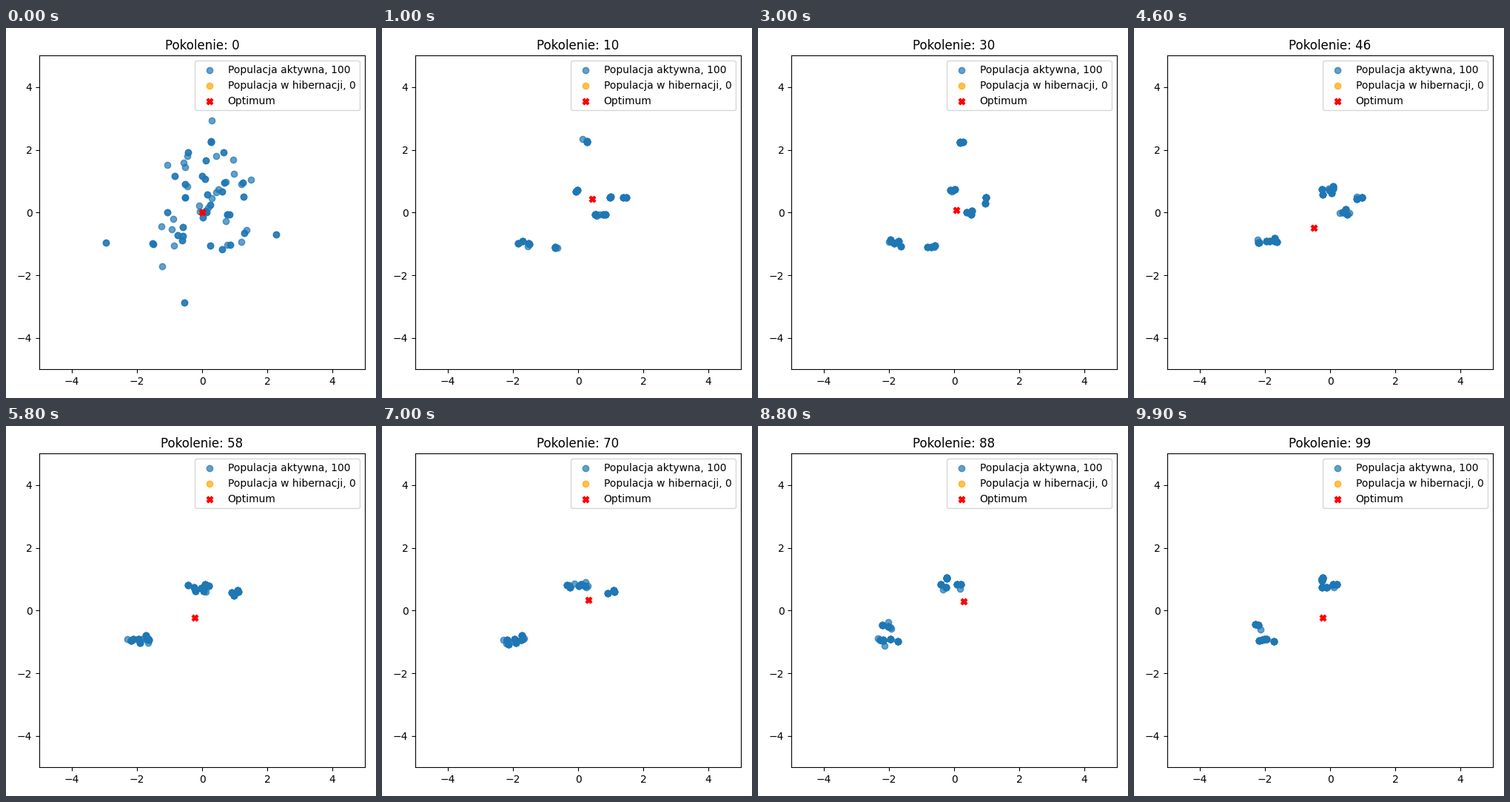
A matplotlib script that plays this animation: 500 px wide and 500 px high, repeating every 10000 ms.

```python
import matplotlib.pyplot as plt
import numpy as np
from matplotlib.animation import FuncAnimation

FRAMES, STEP_MS = 100, 100
POPULATION = 100
SPREAD = (.1, .08)

# Niches where individuals gather: x, y, first and last generation.
NICHES = [
    (.27, 2.25, 0, 36), (-.02, .72, 4, 66), (.98, .48, 6, 60),
    (1.47, .48, 6, 25), (.53, -.06, 5, 58), (.78, -.06, 0, 26),
    (-1.53, -.98, 0, 28), (-1.7, -.91, 10, 78), (-.7, -1.1, 3, 38),
    (-1.96, -.92, 26, 100), (-2.18, -.95, 42, 100), (1.1, .65, 58, 80),
    (-.26, .74, 42, 100), (.1, .83, 40, 100), (-.22, 1.05, 74, 100),
    (-2.2, -.46, 80, 100),
]
OUTLIERS = [(-2.95, -.96), (.3, 2.93), (2.27, -.7), (-1.23, -1.72),
            (-.55, -2.87)]


def first_cloud(rng, count=52):
    """Individuals scattered in a disc, denser towards its middle."""
    r = 1.75 * rng.random(count) ** .6
    a = rng.uniform(0, 2 * np.pi, count)
    disc = np.column_stack([.1 + r * np.cos(a), .3 + r * np.sin(a)])
    return np.vstack([OUTLIERS, disc])


def alive(sites, n):
    sites = np.asarray(sites)
    return sites[(sites[:, 2] <= n) & (n < sites[:, 3])]


def evolve():
    """Crowded and lone sites as rows of x, y, birth, death."""
    rng = np.random.default_rng(7)
    crowd, lone = list(NICHES), []
    for x, y, born, gone in NICHES:
        for t in range(born, gone, 12):
            dx, dy = rng.normal(0, SPREAD)
            end = min(gone, t + rng.integers(10, 24))
            crowd.append((x + dx, y + dy, t, end))

    for i, (x, y) in enumerate(first_cloud(rng)):
        group = lone if i % 2 else crowd
        group.append((x, y, 0, rng.integers(1, 9)))

    for t in range(1, FRAMES):
        parents = rng.choice(alive(crowd, t), 3)
        for x, y in parents[:, :2] + rng.normal(0, SPREAD, (3, 2)):
            lone.append((x, y, t, t + rng.integers(1, 4)))
    return crowd, lone


crowd, lone = evolve()


def population(n):
    single = alive(lone, n)[:, :2]
    shared = alive(crowd, n)[:, :2]
    stacked = np.resize(shared, (POPULATION - len(single), 2))
    return np.vstack([single, stacked])


fig, ax = plt.subplots(figsize=(5, 5), dpi=100)
active = ax.scatter([], [], alpha=.7,
                    label=f"Populacja aktywna, {POPULATION}")
ax.scatter([], [], color="orange", alpha=.7,
           label="Populacja w hibernacji, 0")
optimum = ax.scatter([0], [0], color="red", marker="X", label="Optimum")
ax.set(xlim=(-5, 5), ylim=(-5, 5))
title = ax.set_title("Pokolenie: 0")
ax.legend(loc="upper right")
fig.tight_layout()


def update(n):
    active.set_offsets(population(n))
    optimum.set_offsets([[.5 * np.sin(.1 * n)] * 2])
    title.set_text(f"Pokolenie: {n}")
    return active, optimum, title


anim = FuncAnimation(fig, update, frames=FRAMES, interval=STEP_MS,
                     repeat=True, repeat_delay=0)
plt.show()
```
